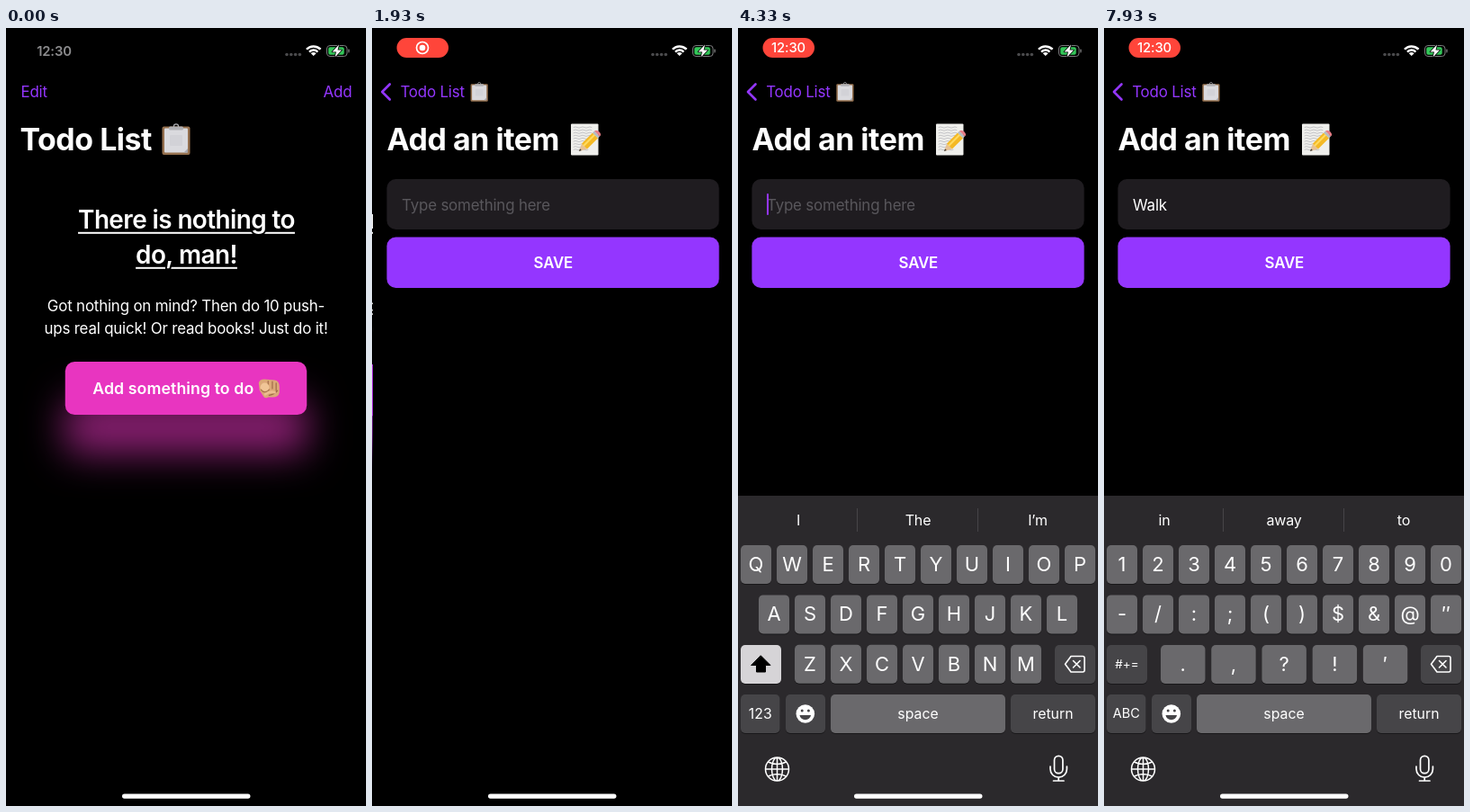
These frames come from a looping animation (400 by 865 pixels, 8 s). An HTML page with a canvas:

```html
<!DOCTYPE html>
<html lang="en">
<head>
<meta charset="utf-8">
<title>Todo List</title>
<style>
  html, body { margin: 0; width: 100%; height: 100%; overflow: hidden; background: #000; }
  canvas { display: block; width: 400px; height: 865px; }
</style>
</head>
<body>
<canvas id="stage"></canvas>
<script>
const W = 400, H = 865, LOOP = 8000;
const PURPLE = '#9436ff', KEY = '#6a696c', DARK_KEY = '#464548';
const PUSH = 1450, FOCUS = 3330, NUMBERS = 7550;

const canvas = document.getElementById('stage');
const ctx = canvas.getContext('2d');
const dpr = window.devicePixelRatio || 1;
canvas.width = W * dpr;
canvas.height = H * dpr;

// Field content and suggestions from the given time on
const typing = [
  [FOCUS, '', ['I', 'The', 'I’m']],
  [4750, 'W', ['“W”', 'We', 'What']],
  [5350, 'Wa', ['“Wa”', 'Was', 'Want']],
  [5750, 'Wa ', ['I', 'is', 'you']],
  [6345, 'Wa', ['“Wa”', 'Was', 'Want']],
  [6580, 'Wal', ['“Wal”', 'Walk', 'Wall']],
  [6820, 'Walk', ['“Walk”', 'Walking', 'Walked']],
  [7250, 'Walk ', ['in', 'away', 'to']],
];

const clamp = v => Math.min(1, Math.max(0, v));
const ramp = (t, start, length) => clamp((t - start) / length);
const smooth = v => v * v * (3 - 2 * v);
const between = (t, a, b) => t >= a && t < b;

function spring(t, start) {
  const x = Math.max(0, t - start) * 0.017;
  return 1 - (1 + x) * Math.exp(-x);
}

function layer(x, y, scale, alpha, draw) {
  ctx.save();
  ctx.translate(x, y);
  ctx.scale(scale, scale);
  ctx.globalAlpha *= alpha;
  draw();
  ctx.restore();
}

function setFont(size = 16.9, weight = 400, track = -0.011) {
  ctx.font = `${weight} ${size}px Inter, sans-serif`;
  ctx.letterSpacing = `${size * track}px`;
}

// y is the middle of the capital letters
function text(s, x, y, { size = 16.9, weight, color = '#fff', align = 'left', track } = {}) {
  setFont(size, weight, track);
  ctx.textAlign = align;
  ctx.fillStyle = color;
  ctx.fillText(s, x, y + size * 0.364);
}

function box(x, y, w, h, r, color) {
  ctx.beginPath();
  ctx.roundRect(x, y, w, h, r);
  ctx.fillStyle = color;
  ctx.fill();
}

function disc(x, y, r, color) {
  ctx.beginPath();
  ctx.arc(x, y, r, 0, 7);
  ctx.fillStyle = color;
  ctx.fill();
}

function shape(d, { fill, stroke, width = 1.8 }) {
  const path = new Path2D(d);
  ctx.lineWidth = width;
  ctx.lineCap = ctx.lineJoin = 'round';
  if (stroke) { ctx.strokeStyle = stroke; ctx.stroke(path); }
  if (fill) { ctx.fillStyle = fill; ctx.fill(path); }
}

const title = s => text(s, 15.5, 124, { size: 33.9, weight: 700, track: -0.0135 });

function clipboard(x, y, scale) {
  layer(x, y, scale, 1, () => {
    box(0.5, 3.5, 31, 31.5, 2, '#95704e');
    box(3, 5.5, 26, 27, 1, '#dadade');
    box(9, 13, 14, 12, 1, '#d2d2d7');
    shape('M24.5 32.5L29 28V32.5Z', { fill: '#a9a9b0' });
    box(8, 3.5, 16, 4, 1.5, '#b0b0b4');
    shape('M13.5 4V3A2.5 2.2 0 0 1 18.5 3V4', { stroke: '#b0b0b4', width: 1.2 });
  });
}

function memo(x, y) {
  layer(x, y, 1, 1, () => {
    box(0, 0.5, 30.5, 35, 1, '#efefec');
    for (let i = 0; i < 9; i++) {
      const row = 4.5 + i * 3.1;
      shape(`M3 ${row}q2 -1.2 4 0t4 0t4 0t4 0${i < 4 ? 't4 0' : ''}`, { stroke: '#b0b0b6', width: 0.7 });
    }
    layer(0, 2, 1, 1, () => {
      shape('M9 29L12 20.5L18 26.5Z', { fill: '#e7c194' });
      shape('M9 29L10 26.2L11.8 28Z', { fill: '#333' });
      shape('M12 20.5L24 8.5L30 14.5L18 26.5Z', { fill: '#f4b925' });
      shape('M14.5 22.5L26 11', { stroke: '#ffdb61', width: 2 });
      shape('M24 8.5L26 6.5L32 12.5L30 14.5Z', { fill: '#b6bcc0' });
      shape('M26 6.5Q28.5 4.5 31.5 7.5T32 12.5Z', { fill: '#e77d86' });
    });
  });
}

function pointingHand(x, y) {
  layer(x, y, 1, 1, () => {
    shape('M1 5Q2 1 7 1L18 2Q23 3 23 9V15Q22 20 16 20L11 20Q8 22 6 19L2 13Z', { fill: '#dba878' });
    shape('M11 3V8M15.5 3.5V11M19.5 5V13M12 18Q18 17 21 13', { stroke: '#9d6946', width: 1.1 });
    disc(7.5, 9.5, 4.8, '#f0c597');
    shape('M3.5 12A5 5 0 0 0 12 12', { stroke: '#a8744e', width: 1.2 });
    shape('M8 17Q13 13 18 15', { stroke: '#ecbd90', width: 2.6 });
  });
}

function underlined(s, y) {
  setFont(27.9, 600, -0.021);
  const width = ctx.measureText(s).width;
  ctx.fillStyle = '#fff';
  ctx.fillRect(200.5 - width / 2, y + 13.8, width, 2);
  ctx.textAlign = 'center';
  ctx.strokeStyle = '#000';
  ctx.lineWidth = 4;
  ctx.strokeText(s, 200.5, y + 10.2);
  text(s, 200.5, y, { size: 27.9, weight: 600, align: 'center', track: -0.021 });
}

function pulsingButton(t) {
  const p = smooth(clamp(Math.abs(t - 1230) / 2500));
  const scale = 1 + 0.1 * p, width = 236 + 41 * p;
  const rgb = `${149 + 170 * p}, 53, ${255 - 130 * p}`;
  layer(200, 404 - 7.2 * p, scale, 1, () => {
    ctx.save();
    ctx.shadowColor = `rgba(${rgb}, 0.6)`;
    ctx.shadowBlur = (20.5 + 41 * p) * scale * dpr;
    ctx.shadowOffsetY = (30.8 + 20.5 * p) * scale * dpr;
    box(-width / 2, -28.2, width, 56.4, 10, `rgb(${rgb})`);
    ctx.restore();
    text('Add something to do', -99, 0, { weight: 600, track: 0.005 });
    pointingHand(76, -10.5);
  });
}

function listPage(t, q) {
  layer(-133 * q, 0, 1, 1, () => {
    layer(0, 0, 1, 1 - q, () => {
      text('Edit', 16.5, 71, { color: PURPLE });
      text('Add', 384.3, 71, { color: PURPLE, align: 'right' });
      title('Todo List');
      clipboard(173, 106, 1);
    });
    underlined('There is nothing to', 213);
    underlined('do, man!', 252);
    text('Got nothing on mind? Then do 10 push-', 200, 309, { align: 'center' });
    text('ups real quick! Or read books! Just do it!', 200, 333.5, { align: 'center' });
    pulsingButton(t);
  });
}

function caretAlpha(t, since) {
  const phase = (t - since) % 1000;
  return Math.max(1 - ramp(phase, 500, 150), ramp(phase, 850, 150));
}

function addPage(t, q, [since, typed]) {
  layer(W * (1 - q), 0, 1, 1, () => {
    ctx.fillStyle = '#000';
    ctx.fillRect(0, 0, W, H);
    title('Add an item');
    memo(220, 106);
    box(15.4, 168, 369.2, 56, 10, '#1f1c20');
    if (typed) text(typed, 32, 196.5);
    else text('Type something here', 32, 196.5, { color: '#59575c' });
    if (t >= FOCUS) {
      setFont();
      const x = 32 + ctx.measureText(typed).width;
      layer(0, 0, 1, caretAlpha(t, since), () => box(x, 184, 2, 24, 1, PURPLE));
    }
    box(15.4, 232.5, 369.2, 56.5, 10, PURPLE);
    text('SAVE', 200.3, 261, { weight: 600, align: 'center' });
  });
  layer(100 * (1 - q), 0, 1, q, () => {
    shape('M19.5 62.5L11 71L19.5 79.5', { stroke: PURPLE, width: 2.6 });
    text('Todo List', 31.2, 71, { color: PURPLE });
    clipboard(109, 60, 0.62);
  });
}

function key(x, y, w, label = '', { fill = KEY, size = 22, color } = {}) {
  box(x, y + 1, w, 43, 5, '#19181a');
  box(x, y, w, 43, 5, fill);
  text(label, x + w / 2, y + 21, { size, color, align: 'center', track: 0 });
}

function keyRow(labels, x, y, options, w = 34, step = 40) {
  [...labels].forEach((label, i) => key(x + i * step, y, w, label, options));
}

function letterKeys(shifted) {
  const rows = ['qwertyuiop', 'asdfghjkl', 'zxcvbnm'];
  const options = { size: shifted ? 22 : 24.5 };
  rows.forEach((row, i) =>
    keyRow(shifted ? row.toUpperCase() : row, [3, 23, 63][i], 575 + 55.4 * i, options));
  key(3, 686, 45, '', { fill: shifted ? '#d6d4d7' : DARK_KEY });
  const arrow = 'M25.5 698L36 708.5H30.5V716H20.5V708.5H15Z';
  shape(arrow, shifted ? { fill: '#000', stroke: '#000', width: 1 } : { stroke: '#fff', width: 1.6 });
}

function numberKeys() {
  keyRow('1234567890', 3, 575);
  keyRow('-/:;()$&@″', 3, 630.4);
  keyRow('.,?!′', 63, 686, {}, 49.5, 56.2);
  key(3, 686, 45, '#+=', { fill: DARK_KEY, size: 13.5 });
}

function keyboard(t, [, typed, suggestions]) {
  layer(0, 345 * (1 - spring(t, FOCUS)), 1, 1, () => {
    ctx.fillStyle = '#2b292c';
    ctx.fillRect(0, 520, W, 345);
    suggestions.forEach((s, i) => text(s, 67 + 133 * i, 547, { size: 16, align: 'center' }));
    box(132, 534, 1, 26, 0, '#464448');
    box(266, 534, 1, 26, 0, '#464448');

    const numeric = t >= NUMBERS;
    if (numeric) numberKeys();
    else letterKeys(!typed);

    const deleting = between(t, 6250, 6400);
    key(352, 686, 45, '', { fill: deleting ? KEY : DARK_KEY });
    shape('M370 698.5H383Q385 698.5 385 700.5V714Q385 716 383 716H370L363.5 707.2Z',
      { stroke: '#fff', width: 1.6, fill: deleting ? '#fff' : undefined });
    shape('M372.5 703.5L380 711M380 703.5L372.5 711',
      { stroke: deleting ? DARK_KEY : '#fff', width: 1.6 });

    const small = { fill: DARK_KEY, size: 15.8 };
    const spacing = between(t, 5720, 5820) || between(t, 7220, 7320);
    key(3, 741, 43.5, numeric ? 'ABC' : '123', { ...small, size: numeric ? 14.5 : 15.8 });
    key(53, 741, 44, '', small);
    key(103, 741, 194, 'space', { ...small, fill: spacing ? DARK_KEY : KEY });
    key(303, 741, 94, 'return', small);
    disc(74.8, 762.5, 10.3, '#fff');
    disc(71.2, 759, 1.5, DARK_KEY);
    disc(78.4, 759, 1.5, DARK_KEY);
    shape('M68.5 764H81A6.3 6 0 0 1 68.5 764Z', { fill: DARK_KEY });

    shape('M30.5 824a13 13 0 1 0 26 0a13 13 0 1 0 -26 0M37.5 824a6 13 0 1 0 12 0a6 13 0 1 0 -12 0' +
      'M43.5 811V837M30.5 824H56.5M33.5 816Q43.5 821 53.5 816M33.5 832Q43.5 827 53.5 832',
      { stroke: '#fff', width: 1.5 });
    shape('M351.5 814a4.7 4.7 0 0 1 9.4 0V824a4.7 4.7 0 0 1 -9.4 0Z' +
      'M347 821V824a9.2 9.2 0 0 0 18.4 0V821M356.2 833.5V837M350.5 837H362',
      { stroke: '#fff', width: 1.7 });
  });
}

function recordingPill(t) {
  const shown = ramp(t, 400, 250), clock = ramp(t, 3000, 200);
  layer(0, 0, 1, 1 - shown, () =>
    text('12:30', 53.5, 25.5, { size: 14.8, weight: 600, color: '#8c8c8e', align: 'center' }));
  layer(0, 0, 1, shown, () => {
    const pulse = 0.94 + 0.06 * Math.cos((t - 1930) / 1200 * 2 * Math.PI);
    layer(0, 0, 1, pulse, () => box(27.5, 11, 57.5, 22, 11, '#ff453a'));
    layer(0, 0, 1, 1 - clock, () => {
      shape('M49.5 22a6.5 6.5 0 1 0 13 0a6.5 6.5 0 1 0 -13 0', { stroke: '#fff', width: 1.7 });
      disc(56, 22, 3.3, '#fff');
    });
    layer(0, 0, 1, clock, () =>
      text('12:30', 56, 22, { size: 14.8, weight: 500, align: 'center' }));
  });
}

function statusBar(t) {
  recordingPill(t);
  for (let i = 0; i < 4; i++) disc(312 + 4.8 * i, 29.5, 1.8, '#4b4b4d');

  ctx.strokeStyle = '#fff';
  ctx.lineCap = 'butt';
  for (const [r, width] of [[2, 4], [6.4, 2.5], [10.6, 2.5]]) {
    ctx.lineWidth = width;
    ctx.beginPath();
    ctx.arc(341.7, 31, r, -Math.PI * 0.76, -Math.PI * 0.24);
    ctx.stroke();
  }

  ctx.beginPath();
  ctx.roundRect(356.5, 19.5, 22.5, 12, 3.5);
  ctx.lineWidth = 1;
  ctx.strokeStyle = '#7b7b7d';
  ctx.stroke();
  box(358.2, 21.2, 17.5, 8.6, 2, '#34c759');
  box(380.3, 23.5, 1.3, 4, 1, '#7b7b7d');
  shape('M370 18.5L362.5 26.5H367L365.5 32.5L373 24.5H368.5Z', { fill: '#fff', stroke: '#000', width: 1.6 });
}

function render(t) {
  ctx.setTransform(dpr, 0, 0, dpr, 0, 0);
  ctx.fillStyle = '#000';
  ctx.fillRect(0, 0, W, H);
  const state = typing.findLast(([start]) => t >= start) || typing[0];
  const pushed = spring(t, PUSH);
  if (pushed < 0.9995) listPage(t, pushed);
  if (t > PUSH) addPage(t, pushed, state);
  if (t > FOCUS) keyboard(t, state);
  statusBar(t);
  box(129, 851.5, 142.5, 5.2, 2.6, '#fff');
}

const began = performance.now();
function frame() {
  render((performance.now() - began) % LOOP);
  requestAnimationFrame(frame);
}
frame();
</script>
</body>
</html>
```
